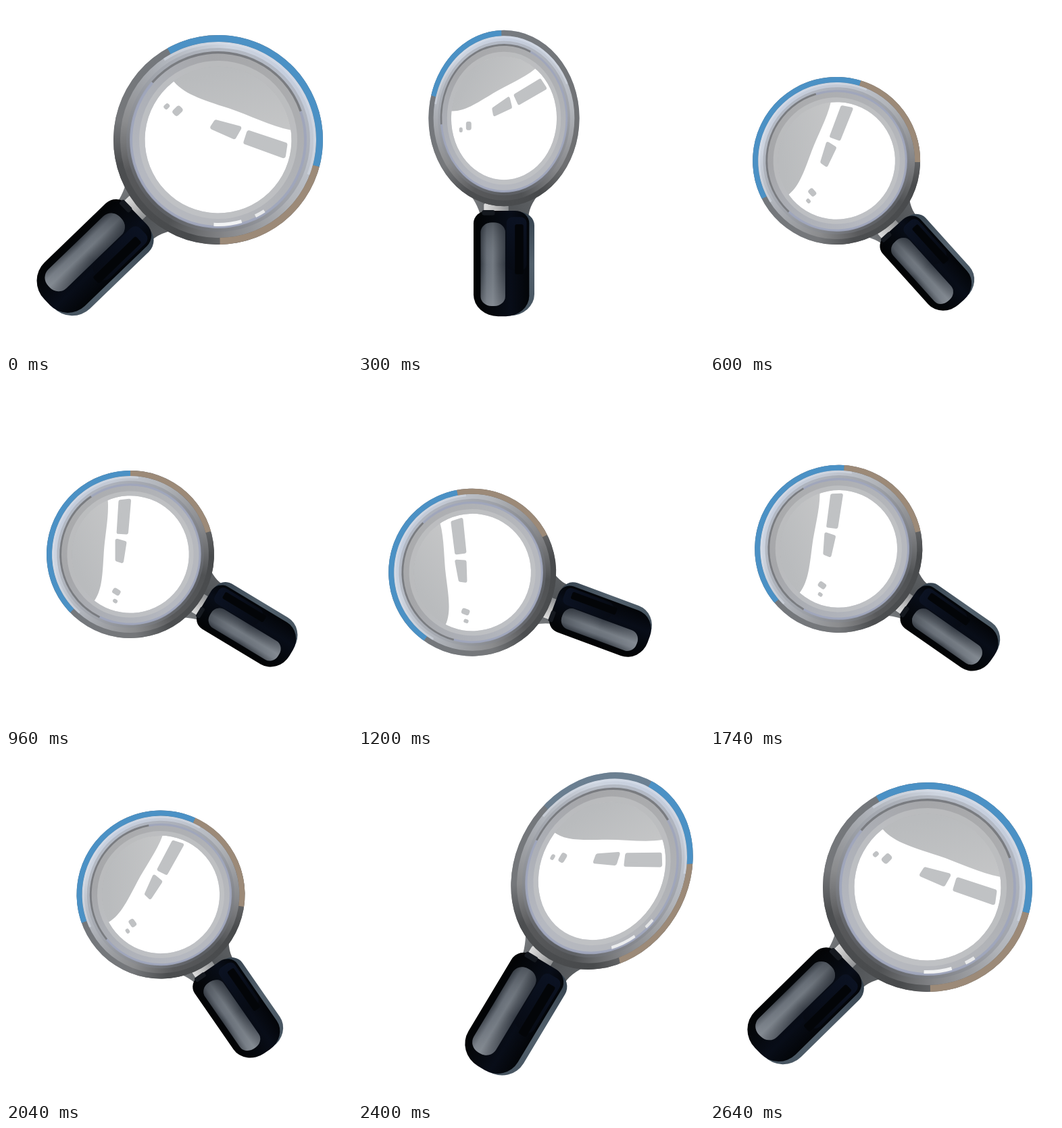
An HTML page with a canvas for the animation above (2.7 s loop, 512 by 512 pixels).

```html
<!DOCTYPE html>
<html lang="en">
<head>
<meta charset="utf-8">
<title>Magnifying glass</title>
<style>
  html, body { margin: 0; width: 100%; height: 100%; overflow: hidden; background: #fff; }
  canvas { display: block; width: 100vmin; height: 100vmin; }
</style>
</head>
<body>
<canvas id="stage" width="512" height="512"></canvas>
<script>
const ctx = document.getElementById('stage').getContext('2d');
const LOOP = 2700, STEP = 60, TAU = Math.PI * 2;
const rad = deg => deg * Math.PI / 180;
const clamp = v => Math.max(0, Math.min(1, v));

// time, lens x, lens y, handle direction, scale across, scale along
const POSES = [
  [0, 314, 198, 136, 1, 1],
  [60, 299, 188, 131, .95, .99],
  [120, 276, 174, 123, .86, .96],
  [180, 253, 164, 112, .78, .91],
  [300, 216, 166, 90, .72, .84],
  [420, 197, 192, 68, .76, .81],
  [540, 188, 222, 52, .8, .8],
  [960, 184, 258, 31, .8, .8],
  [1080, 174, 270, 26, .8, .8],
  [1440, 164, 306, 12.3, .8, .8],
  [1620, 178, 268, 27, .8, .8],
  [2040, 229, 208, 55.3, .803, .803],
  [2160, 252, 182, 72, .76, .845],
  [2280, 303, 149, 97, .72, .91],
  [2400, 361, 173, 121, .825, .98],
  [2460, 362, 182, 127, .93, .99],
  [2580, 337, 193, 134, 1, 1],
  [2640, 322, 197, 135.5, 1, 1]
];

function poseAt(i) {
  const n = POSES.length, lap = Math.floor(i / n);
  const [t, ...rest] = POSES[i - lap * n];
  return [t + lap * LOOP, ...rest];
}

// Smooth periodic interpolation without overshoot
function sample(t) {
  let i = POSES.length - 1;
  while (POSES[i][0] > t) i--;
  const [p, a, b, q] = [-1, 0, 1, 2].map(k => poseAt(i + k));
  const span = b[0] - a[0], u = (t - a[0]) / span;
  return [1, 2, 3, 4, 5].map(c => {
    const slope = (m, n) => (n[c] - m[c]) / (n[0] - m[0]);
    const tangent = (d, e) => d * e <= 0 ? 0 : 2 * d * e / (d + e);
    const mid = slope(a, b);
    const m0 = tangent(slope(p, a), mid) * span, m1 = tangent(mid, slope(b, q)) * span;
    const v = 1 - u;
    return a[c] * (1 + 2 * u) * v * v + m0 * u * v * v
      + b[c] * u * u * (3 - 2 * u) - m1 * u * u * v;
  });
}

function linear(x0, y0, x1, y1, ...colors) {
  const g = ctx.createLinearGradient(x0, y0, x1, y1);
  colors.forEach((c, i) => g.addColorStop(i / (colors.length - 1), c));
  return g;
}

function conic(...stops) {
  const g = ctx.createConicGradient(-Math.PI / 2, 0, 0);
  stops.forEach(([deg, color]) => g.addColorStop(deg / 360, color));
  return g;
}

// Angles run clockwise from the top of the lens
function ring(outer, inner, fill, from = 0, to = 360, alpha = 1) {
  const a = rad(from - 90), b = rad(to - 90);
  ctx.globalAlpha = alpha;
  ctx.fillStyle = fill;
  ctx.beginPath();
  ctx.arc(0, 0, outer, a, b);
  ctx.arc(0, 0, inner, b, a, true);
  ctx.fill();
  ctx.globalAlpha = 1;
}

function box(x, y, w, h, radii, fill) {
  ctx.fillStyle = fill;
  ctx.beginPath();
  ctx.roundRect(x, y, w, h, radii);
  ctx.fill();
}

function softPolygon(points, fill) {
  ctx.fillStyle = ctx.strokeStyle = fill;
  ctx.lineWidth = 7;
  ctx.lineJoin = 'round';
  ctx.beginPath();
  points.forEach(([x, y]) => ctx.lineTo(x, y));
  ctx.closePath();
  ctx.fill();
  ctx.stroke();
}

function drawNeck() {
  ctx.fillStyle = linear(-45, 0, 50, 0, '#777a7d', '#505356', '#5c5f62');
  ctx.beginPath();
  ctx.moveTo(-62, 120);
  ctx.quadraticCurveTo(-40, 150, -36, 174);
  ctx.lineTo(38, 174);
  ctx.quadraticCurveTo(38, 152, 64, 120);
  ctx.fill();
  box(-31, 150, 38, 18, 3, linear(-31, 0, 7, 0, '#dddddd', '#b9b9b9', '#8d8f91'));
}

function drawHandle() {
  box(-36, 165, 83, 183, [22, 24, 38, 34], linear(0, 165, 0, 348, '#35424e', '#53616d', '#465460'));
  box(-47, 163, 86, 186, [22, 22, 36, 38], linear(-47, 0, 39, 0, '#020304', '#05080d', '#080d18', '#030508'));
  box(4, 174, 31, 94, 10, linear(0, 174, 0, 268, '#0b1222', '#070b14'));
  box(17, 187, 13, 88, 3, '#030508');
  box(-34, 162, 20, 9, 3, '#15191f');
  box(-36, 184, 38, 147, 17, linear(-36, 0, 2, 0, '#353b43', '#686f78', '#737a82', '#50565e', '#343a43'));
  box(-36, 184, 38, 147, 17, linear(0, 184, 0, 331, '#20252c66', '#858b9300', '#a0a6ad66'));
}

function drawGlass() {
  ctx.save();
  ctx.beginPath();
  ctx.arc(0, 0, 109, 0, TAU);
  ctx.fillStyle = '#fff';
  ctx.fill();
  ctx.clip();
  const tint = '#c0c2c4';
  ctx.fillStyle = linear(-60, -90, 30, -30, '#b9bbbd', '#c5c6c7');
  ctx.beginPath();
  ctx.moveTo(-112, -13);
  ctx.bezierCurveTo(-85, -10, -62, -23, -22, -44);
  ctx.bezierCurveTo(5, -58, 40, -70, 64, -87);
  ctx.lineTo(70, -125);
  ctx.lineTo(-125, -125);
  ctx.fill();
  softPolygon([[24, -40], [74, -66], [84, -53], [31, -27]], tint);
  softPolygon([[-21, -16], [9, -34], [13, -20], [-19, -7]], tint);
  ctx.restore();
  box(-78, 6, 11, 15, 4, tint);
  box(-92, 16, 7, 9, 3, tint);
}

function drawLens(blueLeft, sideColor, glint) {
  drawGlass();
  ring(155, 128, conic([0, '#c5cede'], [45, '#c3c9d4'], [85, '#b1b4b9'], [130, '#858689'],
    [165, '#505254'], [205, '#58595b'], [235, '#8b8c8e'], [280, '#b1b5bc'], [320, '#cdd4df'], [360, '#c5cede']));
  ring(155, 145, conic([0, '#777b80'], [125, '#6d6e70'], [150, '#484a4c'], [210, '#4c4e50'],
    [235, '#75777a'], [300, '#74787d'], [360, '#777b80']));
  ring(155, 145, '#4b91c5', -75, -2, blueLeft);
  ring(155, 145, '#4b91c5', -2.5, 59, sideColor);
  ring(155, 145, '#9c8a78', 59, 133, sideColor);
  ring(145, 141, '#dce3ee', -80, 65, .45);
  ring(136, 128, conic([0, '#a4a8b0'], [90, '#8f929a'], [180, '#62656b'], [270, '#9b9fa7'], [360, '#a4a8b0']), 0, 360, .55);

  ring(130, 108.5, conic([0, '#aaabad'], [70, '#afb1b5'], [130, '#b6b8bd'], [200, '#b5b8c0'],
    [260, '#acafb6'], [310, '#a5a6a9'], [360, '#aaabad']));
  ring(117, 108.5, '#c5c6c8', 0, 360, .65);
  ring(131, 127.5, '#75777c', -95, 25, .9);
  ring(131, 127, '#9ea5bd', 25, 265, .85);
  ring(128, 123, '#f2f3f4', 118, 137, glint);
  ring(128, 123, '#e9eaeb', 101, 108, glint);
}

function draw(time) {
  const [x, y, direction, across, along] = sample(time);
  const handleWidth = .92 + .11 * Math.sin(rad(direction - 70));
  const blueLeft = 1 - .75 * Math.exp(-(((time - 2400) / 80) ** 2));
  const sideColor = clamp(Math.abs(direction - 90) / 20 - .2);
  const glint = clamp((direction - 112) / 10);

  ctx.fillStyle = '#fff';
  ctx.fillRect(0, 0, 512, 512);
  ctx.save();
  ctx.translate(x, y);
  ctx.rotate(rad(direction - 90));
  ctx.save();
  ctx.scale(handleWidth, along);
  drawNeck();
  drawHandle();
  ctx.restore();
  ctx.scale(across, along);
  drawLens(blueLeft, sideColor, glint);
  ctx.restore();
}

const start = performance.now();
function tick() {
  const elapsed = (performance.now() - start) % LOOP;
  draw(Math.floor(elapsed / STEP) * STEP);
  requestAnimationFrame(tick);
}
tick();
</script>
</body>
</html>
```
